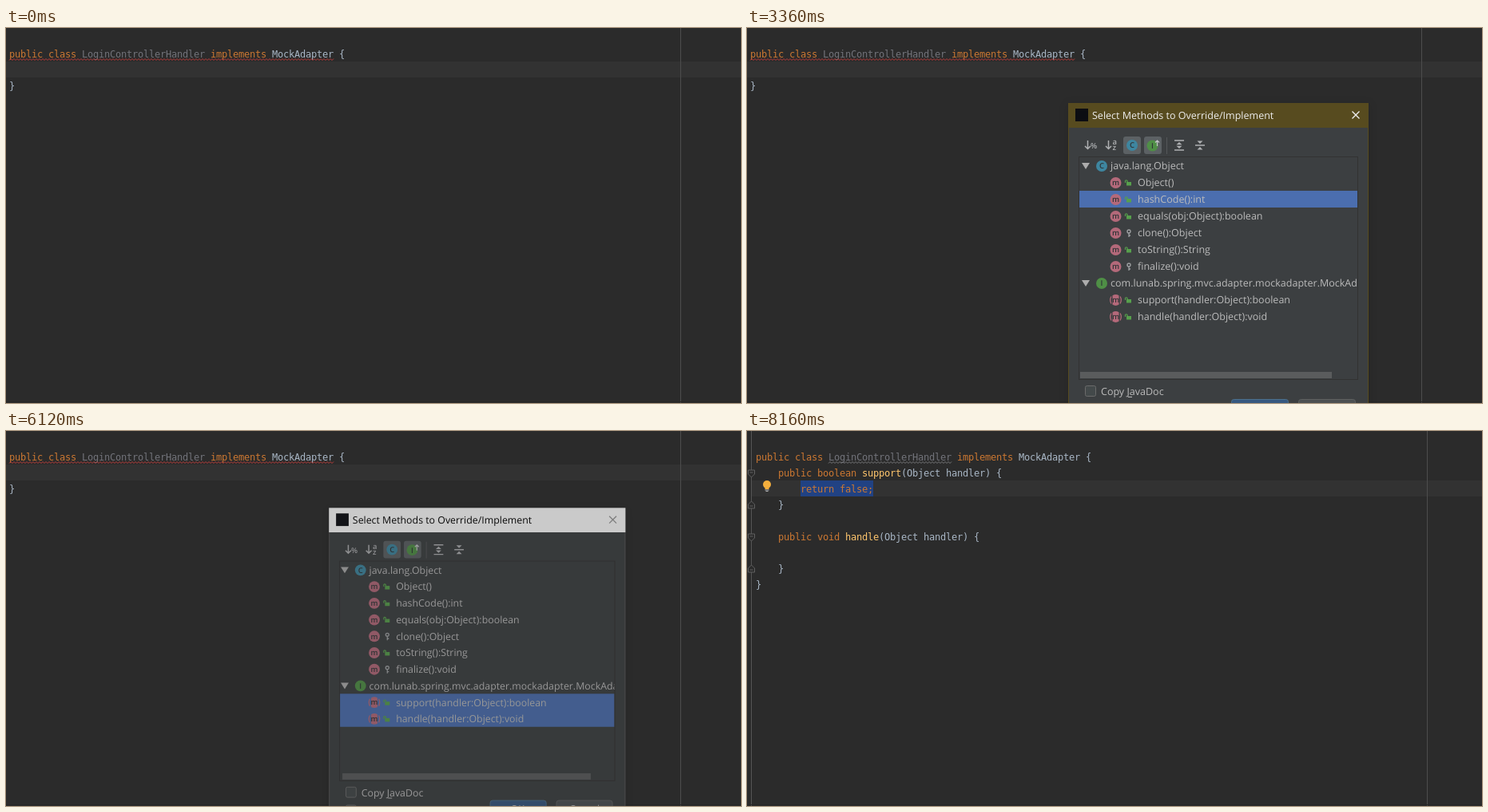
An HTML page that plays this animation: 920 px wide and 470 px high, repeating every 8.4 s.

```html
<!DOCTYPE html>
<html lang="en">
<head>
<meta charset="utf-8">
<title>Override methods dialog</title>
<style>
  html, body { margin: 0; width: 100%; height: 100%; overflow: hidden; background: #2b2b2b; }
  svg { display: block; width: 920px; height: 470px; }
  text { white-space: pre; }
  .code { font: 12px "DejaVu Sans Mono", monospace; fill: #a9b7c6; }
  .ui { font: 12.52px "Open Sans", "Noto Sans", sans-serif; fill: #bbb; text-rendering: geometricPrecision; }
  .code .key { fill: #cc7832; }
  .code .dim { fill: #72737a; }
  .lit .name { fill: #ffc66d; }
  .icon { font: 600 9.5px "Open Sans", sans-serif; fill: #2f3436; text-anchor: middle; }
  .line { fill: none; stroke: #afb1b3; stroke-width: 1.5; }
  #frame { filter: drop-shadow(0 2px 6px rgba(0, 0, 0, .12)); }
</style>
</head>
<body>
<svg id="stage" viewBox="0 0 920 470"></svg>
<script>
const LOOP = 8400, CELL = 7, ROW = 21;
const stage = document.getElementById('stage');
const $ = id => document.getElementById(id);

const rect = (x, y, w, h, fill, extra = '') =>
  `<rect x="${x}" y="${y}" width="${w}" height="${h}" fill="${fill}" ${extra}/>`;
const box = (x, y, w, h, fill, stroke, extra = '') =>
  rect(x + .5, y + .5, w - 1, h - 1, fill, `stroke="${stroke}" ${extra}`);
const path = (d, extra = 'class="line"') => `<path d="${d}" ${extra}/>`;
const text = (x, y, s, extra = '') => `<text x="${x}" y="${y}" ${extra}>${s}</text>`;
const at = (x, y, body) => `<g transform="translate(${x} ${y})">${body}</g>`;

// ---- editor ----

// Tokens are [text, class]; each sits on the character grid.
function codeLine(left, line, col, tokens) {
  return tokens.map(([s, cls = '']) => {
    const out = text(left + col * CELL, 37 + line * 20, s, `class="${cls}"`);
    col += s.length;
    return out;
  }).join('');
}

function wave(id, x0, x1, color) {
  let d = `M${x0} 40.5`;
  for (let x = x0 + 2, up = true; x <= x1; x += 2, up = !up) d += `L${x} ${up ? 38.5 : 40.5}`;
  return path(d, `id="${id}" fill="none" stroke="${color}"`);
}

const header = left => codeLine(left, 0, 0, [
  ['public class ', 'key'], ['LoginControllerHandler ', 'dim'],
  ['implements ', 'key'], ['MockAdapter {']
]);
const margin = x => rect(x, 0, 1, 470, '#4d4d4d');

function foldMark(y, flip) {
  return `<g transform="translate(5.5 ${y}) scale(1 ${flip ? -1 : 1})" fill="#2b2b2b" stroke="#606060">` +
    '<path d="M-4 -4H4V1L0 5L-4 1Z"/><path d="M-2 -1H2"/></g>';
}

const before = `<g id="before" class="code">
  ${rect(0, 42, 920, 20, '#323232')}${margin(844)}
  ${header(4)}${codeLine(4, 2, 0, [['}']])}
  ${wave('redBefore', 4, 410, '#bc3f3c')}
  ${rect(31, 45, 2, 15, '#bbb', 'id="caretBefore"')}
</g>`;

const after = `<g id="after" class="code">
  ${rect(6, 62, 914, 20, '#323232')}${margin(851)}${rect(5, 0, 1, 470, '#555')}
  ${rect(67, 62, 91, 20, '#214283')}
  ${header(11)}
  ${codeLine(11, 1, 4, [['public boolean ', 'key'], ['support', 'name'], ['(Object handler) {']])}
  ${codeLine(11, 2, 8, [['return false;', 'key']])}
  ${codeLine(11, 3, 4, [['}']])}
  ${codeLine(11, 5, 4, [['public void ', 'key'], ['handle', 'name'], ['(Object handler) {']])}
  ${codeLine(11, 7, 4, [['}']])}${codeLine(11, 8, 0, [['}']])}
  ${wave('redAfter', 11, 418, '#bc3f3c')}
  <g id="folds">${wave('unused', 102, 256, '#77787a')}
    ${foldMark(53)}${foldMark(93, true)}${foldMark(133)}${foldMark(173, true)}</g>
  <g id="bulb"><circle cx="25" cy="67" r="5" fill="#f4af3d"/>
    ${rect(22.5, 69, 5, 4, '#f4af3d')}${rect(22.5, 73.5, 5, 1, '#b0b0b0')}${rect(23.5, 75, 3, 1, '#b0b0b0')}</g>
  ${rect(66, 65, 2, 15, '#bbb', 'id="caretAfter"')}
</g>`;

// ---- dialog ----

const badge = (x, y, color, letter) => at(x, y,
  `<circle r="7" fill="${color}"/>` + text(0, 3.4, letter, 'class="icon"'));
const PINK = '#b4697a', CYAN = '#3e86a0', GREEN = '#4f8f46';

const abstractBadge = (x, y) => at(x, y,
  path('M-4 -5.8Q0 -8 4 -5.8V5.8Q0 8 -4 5.8Z', `fill="${PINK}"`) +
  path('M-5.6 -4.5Q-8 0 -5.6 4.5M5.6 -4.5Q8 0 5.6 4.5', `fill="none" stroke="${PINK}" stroke-width="1.3"`) +
  text(0, 3.2, 'm', 'class="icon"'));
const lock = (x, y) => at(x, y, rect(-2, -1, 6, 4.5, '#57a04c') +
  path('M-3.5 0V-2.5Q-2.5 -4 -1 -2.5V-1', 'fill="none" stroke="#57a04c" stroke-width="1.2"'));
const key = (x, y) => at(x, y, path('M0 -.5V5M0 3H2', 'stroke="#9da0a2" stroke-width="1.3" fill="none"') +
  '<circle cy="-2" r="2" fill="none" stroke="#9da0a2" stroke-width="1.4"/>');

const rowTop = i => 162 + i * ROW;

function classRow(i, color, letter, label) {
  const y = rowTop(i) + 11;
  return path(`M419 ${y - 4}h10l-5 8z`, 'fill="#adadad"') +
    badge(444, y, color, letter) + text(455, y + 4.4, label);
}

function methodRow(i, label, kind) {
  const y = rowTop(i) + 11;
  return (kind === 'abstract' ? abstractBadge(461.5, y) : badge(461.5, y, PINK, 'm')) +
    (kind === 'key' ? key(478, y) : lock(477, y)) + text(489, y + 4.4, label);
}

const tree = classRow(0, CYAN, 'C', 'java.lang.Object') +
  [['Object()'], ['hashCode():int'], ['equals(obj:Object):boolean'], ['clone():Object', 'key'],
   ['toString():String'], ['finalize():void', 'key']]
    .map(([label, kind], i) => methodRow(i + 1, label, kind)).join('') +
  classRow(7, GREEN, 'I', 'com.lunab.spring.mvc.adapter.mockadapter.MockAdapter') +
  methodRow(8, 'support(handler:Object):boolean', 'abstract') +
  methodRow(9, 'handle(handler:Object):void', 'abstract');

const downArrow = x => path(`M${x} 141V151M${x - 3.5} 148L${x} 151.5L${x + 3.5} 148`);
const small = (x, y, s) => text(x, y, s, 'style="font-size:9.5px;font-weight:600;fill:#afb1b3"');

const toolbar = downArrow(426.5) + small(430, 151, '%') +
  downArrow(452.5) + small(457.5, 146, 'a') + small(457.5, 153, 'z') +
  rect(471, 136, 22, 22, '#5c6164', 'rx="3"') + badge(482, 147, CYAN, 'C') +
  rect(497, 136, 22, 22, '#5c6164', 'rx="3"') + badge(507.5, 147.5, GREEN, 'I') +
  path('M513.5 148V141M511 143.5L513.5 141L516 143.5', 'fill="none" stroke="#c4c6c8" stroke-width="1.2"') +
  rect(525, 137, 1, 21, '#555759') +
  path('M535 141H547M535 153H547') +
  path('M537.5 146.3L541 143L544.5 146.3ZM537.5 147.7L541 151L544.5 147.7Z', 'fill="#afb1b3"') +
  path('M561 147H573') +
  path('M563.5 141.5H570.5L567 145ZM563.5 152.5H570.5L567 149Z', 'fill="#afb1b3"');

const checkBox = y => box(423, y, 14, 14, '#43494a', '#6b6b6b', 'rx="2"');

const dialog = `<g id="dialog" class="ui">
  ${rect(402, 94, 376, 412, '#3c3f41', 'id="frame"')}
  ${box(402, 94, 376, 412, 'none', '#574b1f', 'id="edge"')}
  ${rect(402, 94, 376, 31, '#574b1f', 'id="bar"')}
  <g id="title">${rect(411, 101, 16, 16, '#0c0d12')}
    ${text(432, 114, 'Select Methods to Override/Implement')}
    ${path('M757.5 104.5L766.5 113.5M766.5 104.5L757.5 113.5', 'id="close" fill="none" stroke="#eee" stroke-width="1.3"')}</g>
  ${toolbar}
  ${box(415, 161, 350, 280, 'none', '#323232')}
  <g clip-path="url(#view)">
    ${rect(416, 0, 348, ROW, '#4b6eaf', 'id="pick"')}
    <g id="tree">${tree}</g>
    ${rect(417, 431, 315, 8, '#5a5c5d', 'id="thumb"')}
  </g>
  ${checkBox(448)}${text(443, 460, 'Copy JavaDoc')}${rect(477, 462, 5, 1, '#bbb')}
  ${checkBox(471)}${path('M426 478L429 481L434 474')}${text(443, 483, 'Insert @Override')}
  ${box(606, 465, 72, 24, '#365880', '#4c708c', 'id="ok" rx="3"')}${text(641, 481, 'OK', 'text-anchor="middle"')}
  ${box(690, 465, 72, 24, '#4c5052', '#5e6060', 'rx="3"')}${text(726, 481, 'Cancel', 'text-anchor="middle"')}
</g>`;

stage.innerHTML =
  '<defs><clipPath id="view"><rect x="416" y="162" width="348" height="278"/></clipPath></defs>' +
  rect(0, 0, 920, 470, '#2b2b2b') + before + after + rect(0, 468, 920, 1, '#262626') + dialog;

// Keep code glyphs on the grid however the font's advance is rounded.
const probe = document.querySelector('.key');
const spacing = CELL - probe.getComputedTextLength() / probe.textContent.length;
document.querySelectorAll('.code text').forEach(n => { n.style.letterSpacing = spacing + 'px'; });

// ---- motion ----

const OPEN = 2220, CLOSE = 6120, STEP = 60;
const opening = [[.93, .25], [.968, .55], [.988, .8], [.996, .95]];
const closing = [[.987, .75], [.973, .45], [.957, .19], [.945, .06]];
const picks = [[0, 1], [3360, 2], [3480, 3], [3600, 4], [3780, 5], [3900, 6], [4020, 7], [4140, 8]];

const show = (id, on) => { $(id).style.display = on ? '' : 'none'; };
const within = (t, a, b) => t >= a && t < b;
const set = (id, name, value) => $(id).setAttribute(name, value);

function drawDialog(t) {
  const shut = t >= CLOSE;
  const [scale, alpha] = t < OPEN ? [1, 0]
    : shut ? closing[Math.floor((t - CLOSE) / STEP)] || [1, 0]
    : opening[Math.floor((t - OPEN) / STEP)] || [1, 1];
  show('dialog', alpha > 0);
  set('dialog', 'opacity', alpha);
  set('dialog', 'transform', scale === 1 ? '' : `translate(575 278) scale(${scale}) translate(-575 -278)`);

  const row = picks.filter(p => t >= p[0]).pop()[1];
  set('pick', 'y', rowTop(row));
  set('pick', 'height', t >= 5160 ? 2 * ROW : ROW);
  const shift = t >= 4020 ? 2 : 0;
  set('tree', 'transform', `translate(${-shift} 0)`);
  set('thumb', 'x', 417 + shift);
  set('ok', 'fill', row === 7 ? '#3c3f41' : '#365880');
  set('ok', 'stroke', row === 7 ? '#5e6060' : '#4c708c');

  // The title bar turns white once the window loses focus.
  set('bar', 'fill', shut ? '#fff' : '#574b1f');
  set('edge', 'stroke', shut ? '#555' : '#574b1f');
  set('title', 'fill', shut ? '#000' : '#eee');
  set('close', 'stroke', shut ? '#999' : '#eee');
}

function draw(t) {
  const inserted = t >= 6180, checked = t >= 6420;
  show('before', !inserted);
  show('after', inserted);
  show('caretBefore', within(t, 780, 1740));
  show('caretAfter', t < 7200 || within(t, 7680, 8160));
  show('redAfter', !checked);
  show('folds', checked);
  show('bulb', t >= 6960);
  $('after').classList.toggle('lit', checked);
  drawDialog(t);
}

const start = performance.now();
function tick() {
  draw((performance.now() - start) % LOOP);
  requestAnimationFrame(tick);
}
tick();
</script>
</body>
</html>
```
